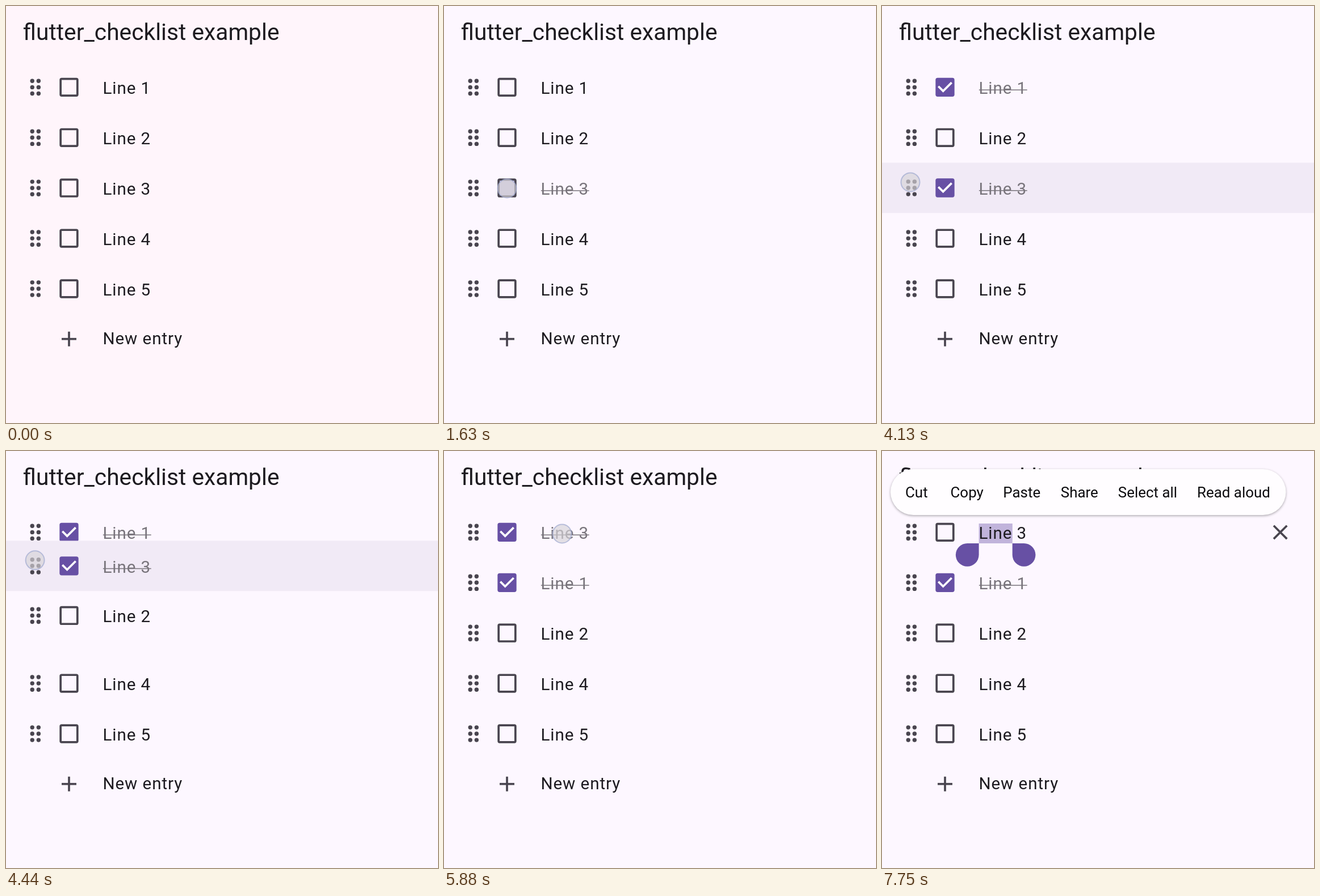
Animation of 761x736 px, one loop 8000 ms. Source, as an HTML page with a canvas:

```html
<!DOCTYPE html>
<html lang="en">
<head>
<meta charset="utf-8">
<title>Checklist</title>
<style>
html, body { margin: 0; width: 100%; height: 100%; overflow: hidden; background: #fdf7ff; }
canvas { display: block; }
</style>
</head>
<body>
<canvas id="stage" width="761" height="736"></canvas>
<script>
const ctx = document.getElementById('stage').getContext('2d');
const LOOP = 8000;
const DP = 1.852;              // pixels per layout unit
const ROW = 48 * DP;
const TOP = 143.4;             // centre of the first row
const BOX_X = 111, TEXT_X = 170.4;
const INK = '#1d1b20', ICON = '#49454f', FADED = '#78747b', PRIMARY = '#6750a4';

const CHECK_3 = 1600, CHECK_1 = 2430, LIFT = 3700, DROP = 4635;
const SELECT = 5940, MENU = 6050, UNCHECK_3 = 6990, MENU_GROW = 7060;

const ramp = (t, start, length) => Math.min(1, Math.max(0, (t - start) / length));
const smooth = p => p * p * (3 - 2 * p);
const mix = (a, b, p) => a + (b - a) * p;
const slot = i => TOP + i * ROW;

function text(str, x, y, size, color, spacing = 0) {
  ctx.font = `${size}px Roboto, sans-serif`;
  ctx.letterSpacing = spacing + 'px';
  ctx.fillStyle = color;
  ctx.fillText(str, x, y);
}

function disc(x, y, r) {
  ctx.beginPath();
  ctx.arc(x, y, r, 0, Math.PI * 2);
  ctx.fill();
}

function polyline(points, color) {
  ctx.strokeStyle = color;
  ctx.lineWidth = 2 * DP;
  ctx.beginPath();
  points.forEach(([x, y]) => ctx.lineTo(x, y));
  ctx.stroke();
}

function roundRect(x, y, w, h, r) {
  ctx.beginPath();
  ctx.roundRect(x, y, w, h, r);
}

function checkbox(y, amount) {
  const size = 18 * DP, left = BOX_X - size / 2, top = y - size / 2;
  if (amount > 0) {
    ctx.save();
    ctx.globalAlpha *= Math.min(1, amount * 2);
    ctx.fillStyle = PRIMARY;
    roundRect(left, top, size, size, 2 * DP);
    ctx.fill();
    ctx.restore();
  }
  if (amount < 0.5) {
    ctx.strokeStyle = ICON;
    ctx.lineWidth = 2 * DP;
    roundRect(left + DP, top + DP, size - 2 * DP, size - 2 * DP, DP);
    ctx.stroke();
  } else if (amount > 0.5) {
    const draw = amount * 2 - 1;
    const at = (x, y) => [left + x * size, top + y * size];
    const first = Math.min(1, draw * 2), second = Math.max(0, draw * 2 - 1);
    const tick = [at(0.15, 0.45), at(mix(0.15, 0.4, first), mix(0.45, 0.7, first))];
    if (second) tick.push(at(mix(0.4, 0.85, second), mix(0.7, 0.25, second)));
    polyline(tick, '#fff');
  }
}

function row(label, y, amount, done) {
  ctx.fillStyle = ICON;
  for (const dx of [-3, 3])
    for (const dy of [-6, 0, 6]) disc(51.8 + dx * DP, y + dy * DP, 2 * DP);
  checkbox(y, amount);
  text(label, TEXT_X, y + 12, 16 * DP, done ? FADED : INK, 0.5 * DP);
  if (done) ctx.fillRect(TEXT_X + 0.5, y + 4, ctx.measureText(label).width, 1.5);
}

// Finger: press and release times and a path of [time, x, y] points
const touches = [
  { down: 1310, up: CHECK_3, path: [[0, 111, 322]] },
  { down: 2190, up: CHECK_1, path: [[0, 115, 134]] },
  { down: 3190, up: DROP, path: [[3190, 44, 328.5], [4000, 44, 327], [4130, 50, 311], [4600, 51.5, 150]] },
  { down: 5440, up: MENU, path: [[0, 208, 146]] },
  { down: 6750, up: UNCHECK_3, path: [[0, 98, 140]] },
];

function along(path, t) {
  const i = path.findLastIndex(point => point[0] <= t);
  if (i < 0) return path[0].slice(1);
  const from = path[i], to = path[i + 1];
  if (!to) return from.slice(1);
  const p = smooth(ramp(t, from[0], to[0] - from[0]));
  return [mix(from[1], to[1], p), mix(from[2], to[2], p)];
}

function drawTouch({ down, up, path }, t) {
  const fade = ramp(t, up, 300);
  if (t < down || fade === 1) return;
  const [x, y] = along(path, t);
  const shown = ramp(t, down - 30, 60);
  ctx.save();
  ctx.globalAlpha = shown * (1 - fade ** 3);
  ctx.fillStyle = 'rgba(214,212,216,.66)';
  disc(x, y, 16.5);
  ctx.globalAlpha = shown * (1 - fade * 0.8);
  ctx.strokeStyle = 'rgba(160,170,208,.7)';
  ctx.lineWidth = 2;
  ctx.stroke();
  ctx.restore();
}

function draggedY(t) {
  const held = Math.min(slot(2), along(touches[2].path, t)[1] + 10);
  return mix(held, slot(0), smooth(ramp(t, DROP, 250)));
}

function selection() {
  const d = 22 * DP, r = d / 2;
  ctx.fillStyle = PRIMARY;
  roundRect(170.6 - d, 163, d, d, [r, 0, r, r]);
  ctx.fill();
  roundRect(229.7, 163, d, d, [0, r, r, r]);
  ctx.fill();
  polyline([[690, 131.8], [713.3, 155.1]], ICON);
  polyline([[690, 155.1], [713.3, 131.8]], ICON);
}

const shortMenu = { Copy: 41, Share: 134.3, 'Select all': 235.3, 'Read aloud': 374.3 };
const fullMenu = { Cut: 41, Copy: 120.5, Paste: 213.3, Share: 314.8, 'Select all': 415.8, 'Read aloud': 555 };

function menu(t) {
  const right = mix(531, 711.5, ramp(t, MENU_GROW, 140));
  ctx.save();
  ctx.globalAlpha = ramp(t, MENU, 150);
  ctx.save();
  ctx.shadowColor = 'rgba(0,0,0,.32)';
  ctx.shadowBlur = 4;
  ctx.shadowOffsetY = 1.5;
  ctx.fillStyle = '#fffdff';
  roundRect(15, 32, right - 15, 81, 40.5);
  ctx.fill();
  ctx.restore();
  ctx.clip();
  for (const [label, x] of Object.entries(t < MENU_GROW ? shortMenu : fullMenu))
    text(label, x, 81.7, 14 * DP, '#0c0b0e');
  ctx.restore();
}

function render(t) {
  const settle = ramp(t, 60, 440);
  ctx.fillStyle = `rgb(${mix(255, 253, settle)},${mix(245, 247, settle)},${mix(251, 255, settle)})`;
  ctx.fillRect(0, 0, 761, 736);
  text('flutter_checklist example', 29.8, 60, 22 * DP, INK);

  const selected = t >= SELECT;
  const shift = start => ROW * smooth(ramp(t, start, 250));
  row('Line 1', slot(0) + shift(4470), ramp(t, CHECK_1, 200), t >= CHECK_1);
  row('Line 2', slot(1) + shift(4290), 0, false);
  row('Line 4', slot(3), 0, false);
  row('Line 5', slot(4), 0, false);

  const y = draggedY(t);
  const lifted = ramp(t, LIFT, 150) * (1 - ramp(t, DROP, 150));
  if (lifted) {
    ctx.globalAlpha = lifted;
    ctx.fillStyle = '#f1eaf6';
    ctx.fillRect(0, y - ROW / 2, 761, ROW);
    ctx.globalAlpha = 1;
  }
  if (selected) {
    ctx.fillStyle = '#c1b4db';
    ctx.fillRect(170.6, 128, 59.2, 35);
  }
  row('Line 3', y, ramp(t, CHECK_3, 200) - ramp(t, UNCHECK_3, 200), t >= CHECK_3 && t < UNCHECK_3);

  const plusY = 587.7, arm = 7 * DP;
  polyline([[BOX_X - arm, plusY], [BOX_X + arm, plusY]], ICON);
  polyline([[BOX_X, plusY - arm], [BOX_X, plusY + arm]], ICON);
  text('New entry', TEXT_X, 597, 16 * DP, INK, 0.5 * DP);

  if (selected) selection();
  if (t >= MENU) menu(t);
  touches.forEach(touch => drawTouch(touch, t));
}

const begin = performance.now();
function tick() {
  render((performance.now() - begin) % LOOP);
  requestAnimationFrame(tick);
}
tick();
</script>
</body>
</html>
```
